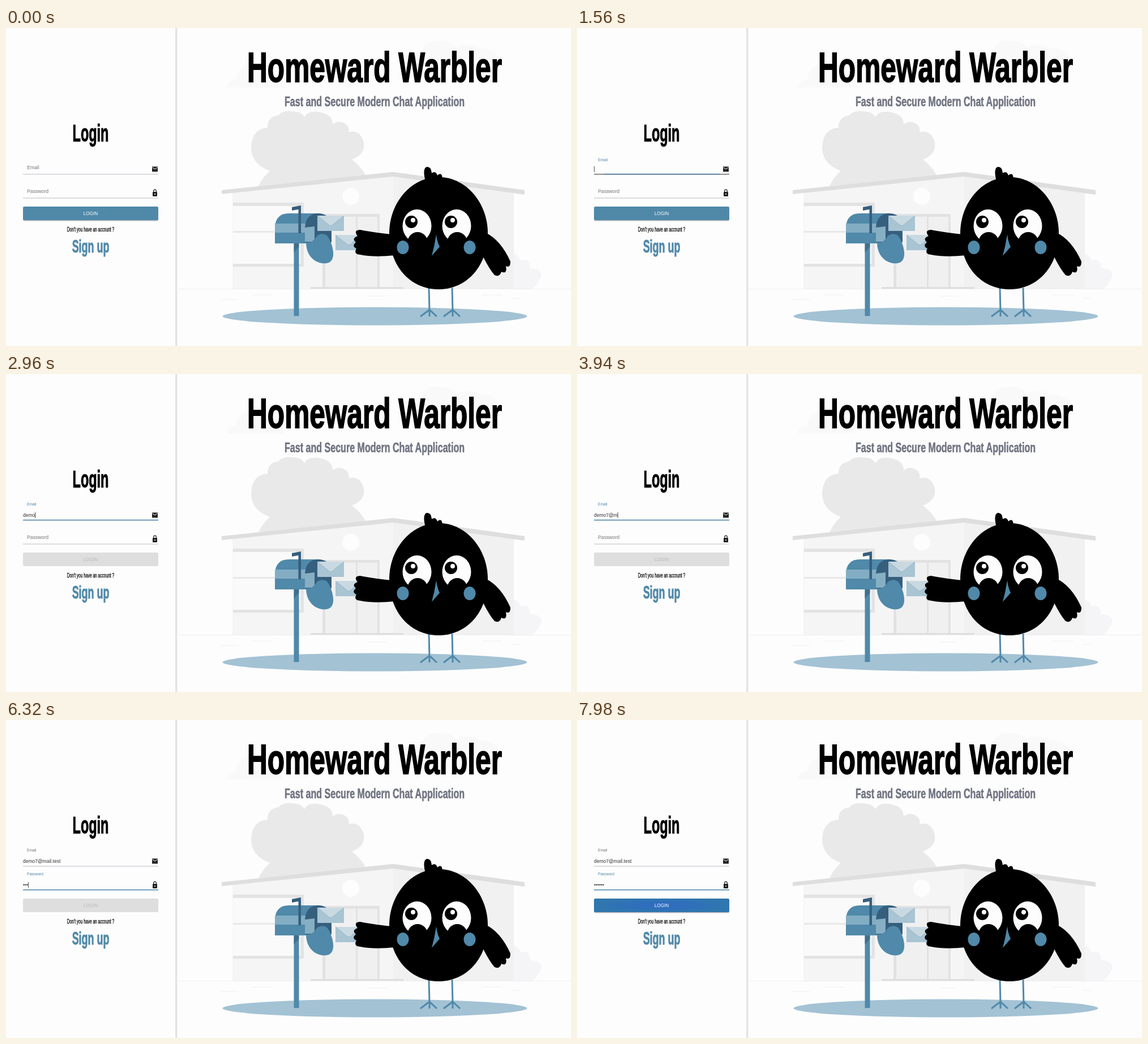
Recreate the animation shown at these times as an HTML page. Size 998 by 561 pixels, loop 8000 ms.

```html
<!DOCTYPE html>
<html lang="en">
<head>
<meta charset="utf-8">
<title>Login</title>
<style>
  html, body { margin: 0; width: 100%; height: 100%; overflow: hidden; background: #fdfdfd; }
  svg { display: block; width: 100vw; height: 100vh; }
  text { font-family: "Liberation Sans", Arial, sans-serif; }
  .display { font-weight: bold; text-anchor: middle; }
  .display text { fill: currentColor; stroke: currentColor; stroke-width: .025em; }
  .input { font-size: 8.5px; fill: #333; white-space: pre; }
  .blue { fill: #5089a9; color: #5089a9; }
  .pale { fill: #a3c2d4; }
  .navy { fill: #365e7d; }
  .white { fill: #fdfdfd; }
  .legs { fill: none; stroke: #5089a9; stroke-width: 3; }
</style>
</head>
<body>
<svg viewBox="0 0 998 561" preserveAspectRatio="none">
  <defs>
    <linearGradient id="edge">
      <stop offset="0" stop-color="#d2d2d4"/>
      <stop offset="1" stop-color="#fdfdfd"/>
    </linearGradient>
    <radialGradient id="ripple">
      <stop offset="0" stop-color="#2f6cc0"/>
      <stop offset=".5" stop-color="#2f6cc0" stop-opacity=".7"/>
      <stop offset="1" stop-color="#2f6cc0" stop-opacity="0"/>
    </radialGradient>
    <g id="letter">
      <path fill="#a9c4d3" d="M0 0H47V27H0Z"/>
      <path fill="#c9d9e2" d="M0 0H47L26 17Q23.500 19 21 17Z"/>
      <path fill="none" stroke="#8fb0c3" stroke-width=".8" d="M0 0L21 17Q23.500 19 26 17L47 0"/>
    </g>
    <g id="eye">
      <ellipse class="white" rx="25.500" ry="29"/>
      <ellipse cx="1" cy="30" rx="18" ry="19"/>
      <circle cx="-10" cy="-7" r="11"/>
      <circle class="white" cx="-7" cy="-10" r="4"/>
    </g>
    <path id="leg" d="M0 458L1 500M-15 509L1 497L14 509M1 497V509"/>
  </defs>
  <rect width="998" height="561" fill="#fdfdfd"/>

  <!-- backdrop -->
  <g fill="#f9f9fa">
    <path d="M390 105Q393 90 408 91Q407 70 430 66Q455 60 466 80Q485 80 490 105Z"/>
    <path d="M690 58Q705 42 733 45Q738 20 765 23Q785 22 795 34Q818 24 838 36Q865 35 873 58Z"/>
  </g>
  <path fill="#e9e9ea" d="M446 279Q453 264 466 252Q433 240 433 210Q435 177 462 176Q461 157 481 154Q490 143 512 148Q520 147 527 157Q535 144 556 149Q577 153 577 170Q590 160 603 172Q607 179 605 184Q625 178 632 202Q635 223 611 232Q629 246 637 263Z"/>
  <path fill="#f5f5f7" d="M862 460Q868 430 880 428Q873 406 888 399Q902 394 909 410Q925 405 926 424Q946 424 946 437Q940 452 930 460Z"/>
  <path fill="#f5f5f6" d="M400 290L684 259V460H400Z"/>
  <path fill="#f1f1f2" d="M684 259L897 291V460H684Z"/>
  <path fill="#dededf" d="M381 286L684 254L916 286V294L684 262L381 293Z"/>
  <path fill="#e3e3e4" d="M401 308H526V421H401Z"/>
  <path fill="#fafafa" d="M401 314H520V416H401Z"/>
  <path fill="#e8e8e9" d="M401 358H520V361H401Z"/>
  <circle class="white" cx="609" cy="297" r="15"/>
  <path fill="#e2e2e3" d="M559 328H660V457H559Z"/>
  <path fill="#f0f0f1" d="M564 333H618V457H564ZM621 333H656V457H621Z"/>
  <path fill="#dededf" d="M538 457H702V461H538Z"/>
  <path fill="none" stroke="#efeff0" d="M304 460.500H998M380 479H411M434 471H472M640 473H672M840 471H877M893 477H907"/>

  <!-- mailbox -->
  <ellipse class="pale" cx="651.500" cy="508.500" rx="269" ry="16"/>
  <path class="blue" d="M508.500 380H517.500V508H508.500Z"/>
  <path class="navy" opacity=".6" d="M508.500 380H517.500V386L508.500 396Z"/>
  <path class="blue" d="M475 380V352Q476 327 500 327H553V380Z"/>
  <path fill="#82adc3" d="M475 345H530V361H475Z"/>
  <path class="navy" d="M528 378V352Q530 327 552 327Q575 328 575 352V378Z"/>
  <path fill="#87afc4" d="M528 352L545 350V377H528Z"/>
  <path class="blue" d="M530 380Q542 379 549 367Q558 360 567 366Q576 378 578 395Q579 410 570 414Q558 418 545 410Q531 400 530 380Z"/>
  <path class="navy" d="M505 316L521 313V362H516.500V320L505 322Z"/>
  <use href="#letter" x="550" y="331"/>
  <use href="#letter" x="582" y="365"/>

  <!-- bird -->
  <g class="legs">
    <use href="#leg" x="747"/>
    <use href="#leg" x="788"/>
  </g>
  <path d="M764 263C814 263 851 310 851 362C851 420 814 461 764 461C714 461 677 420 677 362C677 310 714 263 764 263Z"/>
  <path d="M741 270Q735 248 743 245Q751 244 752 256Q759 251 762 260Q770 253 771 266Z"/>
  <path d="M690 365Q650 361 625 356Q613 357 621 367Q610 371 618 378Q610 385 619 389Q613 399 626 400Q650 405 687 401Z"/>
  <path d="M847 361Q874 374 891 412Q891 424 883 420Q886 435 875 430Q872 440 863 436Q854 426 842 402Z"/>
  <use href="#eye" x="726" y="349"/>
  <use href="#eye" x="796" y="349"/>
  <g class="blue">
    <ellipse cx="701" cy="387" rx="10.500" ry="12"/>
    <ellipse cx="819" cy="387" rx="10.500" ry="12"/>
    <path d="M760 364Q761 376 766 386L752 402Q757 384 760 364Z"/>
  </g>

  <!-- condensed headings -->
  <g class="display" transform="translate(651) scale(.67 1)">
    <text y="95.500" font-size="74">Homeward Warbler</text>
    <text y="138.500" font-size="24" color="#717482">Fast and Secure Modern Chat Application</text>
  </g>

  <!-- login panel -->
  <rect x="299.500" width="4" height="561" fill="url(#edge)"/>
  <g class="display" transform="translate(149.500) scale(.56 1)">
    <text y="200.500" font-size="42">Login</text>
    <text y="359.500" font-size="11.800" font-weight="normal">Don't you have an account ?</text>
    <text y="396" font-size="32" class="blue">Sign up</text>
  </g>
  <g id="fields"></g>
  <path fill="#222" d="M258 244.500H268V253.500H258Z"/>
  <path fill="none" stroke="#fff" d="M258.500 246L263 249L267.500 246"/>
  <rect x="259" y="289" width="8" height="8" rx="1" fill="#222"/>
  <path fill="none" stroke="#222" stroke-width="1.200" d="M260.700 289V287.500A2.300 2.300 0 0 1 265.300 287.500V289"/>
  <circle cx="263" cy="293" r="1" fill="#fff"/>

  <rect id="shadow" x="30" y="316.500" width="239" height="24" rx="2.500" fill="#b5b9bd"/>
  <rect id="button" x="30" y="315" width="239" height="24" rx="2.500"/>
  <rect id="press" x="30" y="315" width="239" height="24" rx="2.500" fill="url(#ripple)"/>
  <text id="caption" x="149.500" y="330" font-size="8.200" text-anchor="middle">LOGIN</text>
</svg>

<script>
const LOOP = 8000, EMAIL_FOCUS = 1484, PASSWORD_FOCUS = 5490, PRESS = 7800;
const BLUE = [80, 137, 168], GRAY = [222, 222, 222], HOVER = [48, 119, 174],
      LABEL = [117, 117, 117], ACCENT = [75, 135, 173], WHITE = [255, 255, 255], MUTED = [184, 184, 184];

const $ = id => document.getElementById(id);
const set = (el, attrs) => { for (const key in attrs) el.setAttribute(key, attrs[key]); };
const progress = (t, start, span) => Math.min(1, Math.max(0, (t - start) / span));
const easeOut = (t, start) => 1 - (1 - progress(t, start, 200)) ** 4;
const easeInOut = (t, start) => { const p = progress(t, start, 250); return p * p * (3 - 2 * p); };
const mix = (a, b, p) => a.map((v, i) => v + (b[i] - v) * p);
const rgb = c => `rgb(${c.map(Math.round)})`;

function add(tag, attrs) {
  const el = document.createElementNS("http://www.w3.org/2000/svg", tag);
  set(el, attrs);
  return $("fields").appendChild(el);
}

// y is the underline position; keys holds the time of each key stroke
function makeField(name, y, value, keys, focus, blur) {
  const base = add("rect", { x: 30, y: y - .5, width: 239, height: 1 });
  const line = add("rect", { y: y - 1.1, height: 1.4, fill: rgb(ACCENT) });
  const label = add("text", { x: 37 });
  const text = add("text", { x: 30, y: y - 6, class: "input" });
  const caret = add("rect", { y: y - 14, width: .8, height: 10, fill: "#222" });
  label.textContent = name;

  return t => {
    const raised = easeOut(t, focus), active = raised - easeOut(t, blur);
    const typed = keys.filter(k => k <= t);
    const lastAction = Math.max(focus, ...typed);
    const hovered = t > focus - 180 && t < focus + 250;
    set(base, { fill: hovered ? "#222" : "#bcbcc6" });
    set(line, { x: 149.5 - 119.5 * active, width: 239 * active });
    set(label, { y: y - 8.6 - 17.3 * raised, "font-size": 8.7 - 2.1 * raised, fill: rgb(mix(LABEL, ACCENT, active)) });
    text.textContent = value.slice(0, typed.length);
    const on = t >= focus && t < Math.min(blur, PRESS) && (t - lastAction) % 1060 < 530;
    set(caret, { x: 30 + (typed.length ? text.getComputedTextLength() : 0), opacity: +on });
  };
}

const emailKeys = [2245, 2370, 2650, 2860, 3150, 3500, 3800, 4100, 4250, 4400, 4550, 4700, 4850, 5000, 5130];
const passwordKeys = Array.from({ length: 6 }, (_, i) => 5800 + 180 * i);
const fields = [
  makeField("Email", 258, "demo7@mail.test", emailKeys, EMAIL_FOCUS, PASSWORD_FOCUS),
  makeField("Password", 300, "••••••", passwordKeys, PASSWORD_FOCUS, LOOP + 1)
];

function draw(t) {
  fields.forEach(update => update(t));
  const disabled = easeInOut(t, emailKeys[0]) - easeInOut(t, passwordKeys[5]);
  const hover = easeInOut(t, 7560);
  set($("button"), { fill: rgb(mix(mix(BLUE, GRAY, disabled), HOVER, hover)) });
  set($("shadow"), { opacity: 1 - disabled });
  set($("press"), { opacity: progress(t, PRESS, 180) });
  set($("caption"), { fill: rgb(mix(WHITE, MUTED, disabled)) });
}

const start = performance.now();
function tick() {
  draw((performance.now() - start) % LOOP);
  requestAnimationFrame(tick);
}
tick();
</script>
</body>
</html>
```
